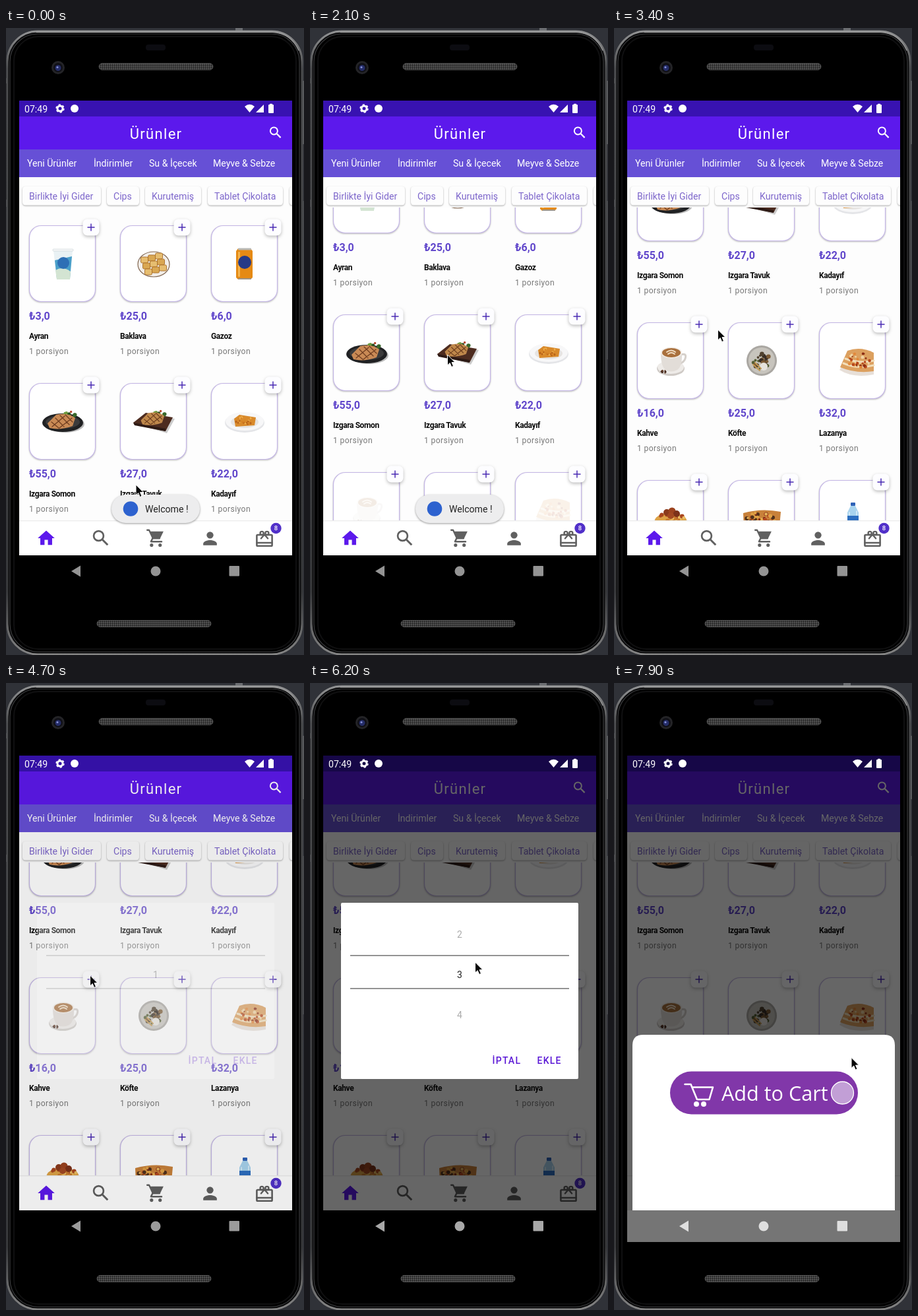
Write an HTML page that moves like this. It is 452x950 px and loops after 8 s.

```html
<!DOCTYPE html>
<html lang="tr">
<head>
<meta charset="utf-8">
<title>Ürünler</title>
<style>
  html, body { margin: 0; width: 100%; height: 100%; overflow: hidden; background: #303238; }
  svg { display: block; width: 452px; height: 950px; font-family: Roboto, sans-serif; }
  .card { fill: #fff; stroke: #c4b6e6; stroke-width: 1.2; filter: drop-shadow(0 1.5px 1.2px #0004); }
  .plus { fill: #fdfdff; filter: drop-shadow(0 2px 2.5px #0004); }
  .chip { fill: #fdfdfd; filter: drop-shadow(0 1px 1.3px #0005); }
  .price { font: 700 16px Roboto, sans-serif; fill: #6046cb; }
  .name { font: 700 12px Roboto, sans-serif; letter-spacing: -.4px; fill: #0c0c0c; }
  .portion { font-size: 12.1px; letter-spacing: .4px; fill: #777; }
  .button { font-weight: 500; font-size: 14px; letter-spacing: 1.25px; fill: #5a17d6; }
  .line { fill: none; stroke-linecap: round; stroke-linejoin: round; }
</style>
</head>
<body>
<svg id="stage" viewBox="0 0 452 950"></svg>
<script>
const LOOP = 8000, STEP = 100;
const COL = 138, ROW = 239, TOP = 299;

const rect = (x, y, w, h, fill, r = 0, extra = '') =>
  `<rect x="${x}" y="${y}" width="${w}" height="${h}" rx="${r}" fill="${fill}" ${extra}/>`;
const circle = (x, y, r, fill, extra = '') => `<circle cx="${x}" cy="${y}" r="${r}" fill="${fill}" ${extra}/>`;
const oval = (x, y, rx, ry, fill, extra = '') => `<ellipse cx="${x}" cy="${y}" rx="${rx}" ry="${ry}" fill="${fill}" ${extra}/>`;
const path = (d, fill, extra = '') => `<path d="${d}" fill="${fill}" ${extra}/>`;
const line = (d, color, w) => `<path class="line" d="${d}" stroke="${color}" stroke-width="${w}"/>`;
const text = (x, y, s, extra = '') => `<text x="${x}" y="${y}" ${extra}>${s}</text>`;
const at = (x, y, s, k = 1) => `<g transform="translate(${x} ${y}) scale(${k})">${s}</g>`;
const repeat = (n, f) => Array.from({ length: n }, (_, i) => f(i)).join('');

function scatter(n, seed, rx, ry, cy, colors, size) {
  let s = seed;
  const rnd = () => (s = (s * 16807) % 2147483647) / 2147483647;
  return repeat(n, i => {
    const a = rnd() * 6.283, d = Math.sqrt(rnd());
    return circle((Math.cos(a) * d * rx).toFixed(1), (cy + Math.sin(a) * d * ry).toFixed(1),
      (size * (.6 + rnd() * .6)).toFixed(1), colors[i % colors.length]);
  });
}

const herbs = (x, y) => at(x, y, scatter(12, 71, 10, 5, 0, ['#39692c', '#6d9a3f', '#284f21', '#b4442c'], 2.6));
const grilled = (color, dark) =>
  path('M-23 3L-10 -10Q8 -14 19 -5L15 7Q-4 14 -20 10Z', color) +
  line('M-17 1l11 9M-11 -5l13 13M-4 -9l14 14M4 -10l11 11M-16 8L3 -8M-5 10L14 -5', dark, 1.3);

// Each dish is drawn around the middle of its card.
const dishes = {
  ayran: path('M-14 -20H15L11 24H-9Z', '#e9f1f4') + path('M-12 -5L14 -11 11 22H-9Z', '#4a9fc9') +
    path('M-11 10Q0 3 12 12L11 24H-9Z', '#d3e4d2') + circle(1, -1, 9, '#2e6fb5') + rect(-15, -22, 31, 3, '#f7f8f8', 1, 'stroke="#ccd4d8" stroke-width=".7"'),
  baklava: oval(0, 1, 24, 19, '#f2eee9', 'stroke="#80654f" stroke-width="1.2"') +
    repeat(9, i => {
      const x = (i % 3 - 1) * 11 + (Math.floor(i / 3) - 1) * 3, y = (Math.floor(i / 3) - 1) * 9 - (i % 3 - 1) * 3;
      return rect(x - 5.5, y - 4, 11, 9, i % 2 ? '#d9a752' : '#e6bd70', 2, 'stroke="#a96d28" stroke-width=".9"');
    }),
  can: path('M-10 -23H9L12 -19V21L9 24H-10L-13 21V-19Z', '#e58a14') + rect(-10, -23.5, 20, 3, '#b9b9b5', 1) +
    rect(-10, 22, 20, 2, '#9e9384', 1) + rect(-10, -18, 3, 38, '#f4b44f', 1) + circle(0, -2, 10, '#263a86'),
  salmon: oval(4, 4, 29, 13, '#bbb') + oval(0, 2, 31, 14, '#202123') + oval(0, 1, 26, 10, '#3b3b3c') +
    herbs(12, -10) + grilled('#c98a55', '#6f3d20'),
  chicken: path('M-30 3L-12 -11 32 -4 20 18Z', '#ccc') + path('M-31 2L-12 -13 29 -6 18 15-29 5Z', '#4d2c20') +
    path('M-31 2L18 11V15L-29 6Z', '#2d1a15') + herbs(10, -11) + at(0, -4, grilled('#bf884b', '#6b3c1d'), .85),
  kadayif: oval(0, 2, 30, 15, '#e4e5e8') + oval(0, 0, 29, 14, '#f7f7f8') + oval(0, 1, 21, 9, '#e6e4e2') +
    path('M-16 -4L-8 -10 17 -6 15 6-14 8Z', '#d98a2b') + scatter(24, 9, 14, 6, -1, ['#eeb04d', '#b9641a', '#d88424'], 1.5),
  coffee: oval(0, 12, 21, 11, '#cfcac6') + oval(0, 10, 20, 10, '#eeebe8') +
    line('M15 -9Q25 -12 22 -3Q20 3 12 5', '#d5d0cb', 3) + path('M-15 -11H17Q18 8 10 14Q0 19 -8 14Q-15 8 -15 -11Z', '#e2ddd8') +
    oval(1, -12, 16, 8.5, '#f2ece5') + oval(1, -12, 14, 7, '#a9703d') + line('M-6 -13Q1 -18 7 -13M-4 -10Q1 -14 6 -10', '#f0ddc3', 2) +
    scatter(9, 33, 5, 3, 17, ['#3c241a', '#6b4430'], 1.5).replace(/cx="/g, 'transform="translate(-11 0)" cx="'),
  kofte: circle(0, 0, 23, '#aaa7a2') + circle(0, 0, 20, '#c7c4bd') + scatter(26, 17, 13, 12, 1, ['#50412f', '#7c5b36', '#555f35', '#382d25'], 3) +
    circle(3, 9, 6, '#e6e3dd') + line('M-13 6l10 9M-10 3l9 9', '#c39a55', 2),
  lasagne: path('M-20 14Q0 27 32 21V10H-17Z', '#e7dfd8') + path('M-19 10L-8 -15Q12 -22 32 -12V16Q5 20 -19 10Z', '#dca05f') +
    line('M-14 4Q8 13 32 7M-11 -3Q10 5 32 0', '#f2dfbb', 3) + scatter(34, 5, 18, 12, 0, ['#b8481d', '#f0d2a1', '#8d2e14', '#e2883a'], 2.2).replace(/cx="/g, 'transform="translate(11 0)" cx="'),
  pasta: oval(0, 8, 28, 12, '#e3dfdc') + oval(0, 3, 24, 11, '#dda246') + scatter(20, 41, 21, 8, 0, ['#e9bd62', '#c7782e', '#a9461f'], 3) +
    circle(-6, -9, 5, '#8a3a1c') + circle(2, -11, 5.5, '#9c431f') + circle(9, -7, 5, '#7c321a') + circle(0, -4, 5, '#a24822'),
  pizza: path('M-28 -8Q0 -16 29 -10L27 12-27 14Z', '#c8813a') + scatter(40, 23, 25, 9, 0, ['#7a2918', '#e9b85b', '#b64a22', '#4e301c', '#dfa045'], 2.6),
  water: rect(-3, -24, 7, 5, '#2e62b8', 1) + path('M-3 -19H4L9 -9V24H-8V-9Z', '#a8d3ee') + rect(-8, -4, 17, 12, '#2d6fc0') + line('M-5 -9V-5M6 -11V-5', '#e5f3fb', 1.4)
};

const products = [
  ['ayran', '3,0', 'Ayran'], ['baklava', '25,0', 'Baklava'], ['can', '6,0', 'Gazoz'],
  ['salmon', '55,0', 'Izgara Somon'], ['chicken', '27,0', 'Izgara Tavuk'], ['kadayif', '22,0', 'Kadayıf'],
  ['coffee', '16,0', 'Kahve'], ['kofte', '25,0', 'Köfte'], ['lasagne', '32,0', 'Lazanya'],
  ['pasta', '28,0', 'Makarna'], ['pizza', '30,0', 'Pizza'], ['water', '2,0', 'Su']
];

const productCard = ([dish, price, name], i) => {
  const row = Math.floor(i / 3);
  return at(i % 3 * COL, TOP + row * ROW,
    `<rect class="card" x="35.5" y=".5" width="100" height="115" rx="18"/>` +
    `<g class="row${row}">${at(86, 58, dishes[dish])}</g>` +
    `<rect class="plus" x="116.5" y="-9.5" width="25" height="25" rx="7"/>` +
    line('M124 3h10M129 -2v10', '#4a2bb4', 1.5) +
    text(35, 143, '₺' + price, 'class="price"') + text(35, 172, name, 'class="name"') +
    text(35, 194.5, '1 porsiyon', 'class="portion"'));
};

const searchIcon = (color, w) => circle(-2.6, -2.6, 5.5, 'none', `stroke="${color}" stroke-width="${w}"`) +
  `<path d="M1.5 1.5L7.6 7.6" stroke="${color}" stroke-width="${w + .2}"/>`;
const cartIcon = line('M-10 -9.5h2.3l4.6 9.8h7.6', '#606060', 1.8) + path('M-7 -8H9.2L5 .8H-3.4Z', '#606060') +
  line('M-3.5 0l-2 4H7', '#606060', 1.9) + circle(-4.8, 8.2, 2, '#606060') + circle(5.2, 8.2, 2, '#606060');
const giftIcon = rect(-9, -5, 18, 13, 'none', 1, 'stroke="#606060" stroke-width="2"') +
  line('M-9 4.2H9', '#606060', 2) + line('M-4 -.8L0 -5.5 4 -.8', '#606060', 1.8) +
  circle(-3, -7, 2, 'none', 'stroke="#606060" stroke-width="1.9"') + circle(3, -7, 2, 'none', 'stroke="#606060" stroke-width="1.9"');

const speaker = (x, y) => rect(x, y, 173, 10, '#343434', 5) + rect(x, y, 173, 10, 'url(#mesh)', 5, 'stroke="#555" stroke-width=".8"');

const phone = () => rect(0, 0, 452, 950, '#303238') +
  rect(0, 76, 6, 195, '#55575b') + rect(0, 84, 3, 176, '#202125') + rect(446, 80, 6, 96, '#5b5d60') +
  rect(446, 262, 6, 240, '#46484c') + rect(348, 0, 11, 6, '#6a6c70') +
  rect(2, 5, 447, 944, '#0a0a0b', 46, 'stroke="url(#rim)" stroke-width="3"') +
  rect(6, 9, 439, 936, '#000', 42, 'stroke="#3a3b3d" stroke-width="1.2"') +
  rect(12, 13, 428, 928, '#000', 37, 'stroke="#101011" stroke-width="2"') +
  line('M46 6.5H404Q432 8 444 34', '#a5a5a5', 1.1) +
  rect(212, 25, 30, 9, '#0c0c11', 4) + speaker(141, 53.5) + speaker(138, 897.5) +
  circle(79, 60, 10, '#242427') + circle(79, 60, 7, '#101016') + circle(79, 60.5, 4.5, '#252d68') + circle(78, 59.5, 1.5, '#8590d8');

const chips = [[25, 119, 'Birlikte İyi Gider'], [153, 49, 'Cips'], [211, 85, 'Kurutemiş'], [306, 114, 'Tablet Çikolata'], [430, 60, '']];
const tabs = [[32, 'Yeni Ürünler'], [133, 'İndirimler'], [217, 'Su &amp; İçecek'], [314, 'Meyve &amp; Sebze']];

const app = () => rect(20, 110, 414, 689, '#fdfdfd') +
  `<g clip-path="url(#listClip)"><g id="list">${products.map(productCard).join('')}</g></g>` +
  rect(20, 110, 414, 24, '#3812b1') + rect(20, 134, 414, 50, '#5c19ec') + rect(20, 184, 414, 42, '#6650d6') +
  text(227.6, 168, 'Ürünler', 'font-size="22" letter-spacing="1.3" fill="#fff" text-anchor="middle"') +
  at(409, 158.5, searchIcon('#fff', 2)) +
  tabs.map(([x, s]) => text(x, 210, s, 'font-size="14.1" fill="#fff"')).join('') +
  chips.map(([x, w, s]) => `<rect class="chip" x="${x}" y="240" width="${w}" height="28.5" rx="4.5"/>` +
    text(x + 10, 260, s, 'font-size="14.1" fill="#7d66cb"')).join('') +
  rect(20, 746, 414, 1.5, '#ececec') + rect(20, 747.5, 414, 51.5, '#fff') +
  at(61, 773, path('M-2 8v-6h4v6h5V0h3L0 -9-10 0h3v8z', '#5c19ec'), 1.28) +
  at(144, 773, searchIcon('#606060', 2), 1.35) + at(227, 773, cartIcon, 1.29) +
  at(309.5, 773.5, circle(0, -4, 4, '#606060') + path('M-8 8V6C-8 3.3-2.7 2 0 2S8 3.3 8 6V8Z', '#606060'), 1.29) +
  at(392, 774.5, giftIcon, 1.29) + circle(409.5, 758, 8.2, '#5130c9') +
  text(409.5, 761.4, '8', 'font-size="9.5" font-weight="500" fill="#fff" text-anchor="middle"');

const statusIcons = () => text(28, 127.7, '07:49', 'font-size="14.1" fill="#fff"') +
  circle(82, 122, 4, 'none', 'stroke="#fff" stroke-width="3"') +
  circle(82, 122, 5.7, 'none', 'stroke="#fff" stroke-width="2" stroke-dasharray="3 2.97"') +
  circle(104, 122, 6, '#fff') +
  path('M362 119Q369.5 112.5 377 119L369.5 128Z', '#fff') + path('M379 128L391 116V128Z', '#fff') +
  rect(398, 116, 8, 13, '#fff', 1) + rect(400, 114.8, 4, 2, '#fff');

const dialog = () => rect(47, 333, 360, 267, '#fff', 2) +
  rect(61, 412, 332, 1.8, '#888') + rect(61, 462, 332, 1.8, '#888') +
  `<g clip-path="url(#wheelClip)" font-size="14" text-anchor="middle">${repeat(6, i => text(227, 0, i + 1, 'class="digit"'))}</g>` +
  text(276.5, 577, 'İPTAL', 'class="button"') + text(344.5, 577, 'EKLE', 'class="button"');

const sheet = () => path('M28 900V549Q28 533 44 533H410Q426 533 426 549V900Z', '#fff') +
  `<g id="pill">${rect(-142.5, -32.5, 285, 65, '#8137a9', 32.5)}</g>` +
  line('M107.5 608h9l9.5 23h18.5l5.5 -18.500h-31', '#fff', 2.6) + circle(125, 638, 4, '#fff') + circle(136, 638, 4, '#fff') +
  text(163, 632.5, 'Add to Cart', 'font-size="30.6" fill="#fff" style="font-family:\'Open Sans\',\'Noto Sans\',sans-serif"') +
  `<path id="ring" d="M346.500 604a17 17 0 0 1 0 34a17 17 0 0 1 0 -34" pathLength="100" fill="#fff" stroke="#fff" stroke-width="1.3"/>`;

const toast = () => `<rect x="160" y="707" width="134" height="43" rx="21.5" fill="#ededee" style="filter:drop-shadow(0 1.5px 1.5px #0006)"/>` +
  circle(189, 728.5, 11.3, '#2d62cf') + text(211, 733.7, 'Welcome !', 'font-size="14.1" fill="#222"');

const clip = (id, x, y, w, h) => `<clipPath id="${id}">${rect(x, y, w, h, '#000')}</clipPath>`;
const stage = document.getElementById('stage');
stage.innerHTML = `<defs>
  ${clip('screenClip', 20, 110, 414, 737)}${clip('listClip', 20, 272, 414, 475)}${clip('wheelClip', 61, 345, 332, 195)}
  <pattern id="mesh" width="3" height="3" patternUnits="userSpaceOnUse">${circle(1, 1, .8, '#777')}${circle(2.5, 2.5, .6, '#161616')}</pattern>
  <linearGradient id="rim" x2="0" y2="1"><stop stop-color="#929394"/><stop offset=".06" stop-color="#4b4c4e"/><stop offset=".9" stop-color="#37383a"/><stop offset="1" stop-color="#858585"/></linearGradient>
</defs>${phone()}
<g clip-path="url(#screenClip)">${app()}
  ${rect(20, 110, 414, 689, '#000', 0, 'id="dim"')}
  <g id="toast">${toast()}</g><g id="dialog">${dialog()}</g><g id="sheet">${sheet()}</g>
  ${rect(20, 799, 414, 48, '#757575', 0, 'id="navBar"')}
  <g id="navIcons">${path('M99 823L113 814.5V831.500Z', '#fff')}${circle(227, 823, 7.5, '#fff')}${rect(338.5, 815, 15.5, 15.5, '#fff', 1)}</g>
  ${statusIcons()}
</g>
<g id="cursor">${path('M0 0V16L3.700 12.600 6.200 18.500 9 17.300 6.500 11.600H11.500Z', '#080808', 'stroke="#fff" stroke-width="1"')}</g>`;

const el = id => document.getElementById(id);
const digits = [...stage.querySelectorAll('.digit')];
const setOpacity = (node, v) => node.setAttribute('opacity', v);
const move = (node, x, y, k = 1) => node.setAttribute('transform', `translate(${x} ${y}) scale(${k})`);

// Linear interpolation through [time, value] pairs.
function key(t, ...points) {
  if (t <= points[0][0]) return points[0][1];
  for (let i = 1; i < points.length; i++) {
    const [t0, a] = points[i - 1], [t1, b] = points[i];
    if (t <= t1) return a + (b - a) * (t - t0) / (t1 - t0);
  }
  return points[points.length - 1][1];
}

function scrollAt(t) {
  if (t <= 2100) return key(t, [1900, 0], [2000, 46], [2100, 104]);
  const u = Math.min(1, (t - 2100) / 900);
  return 104 + 227 * (1 - (1 - u) ** 2);
}

function draw(t) {
  move(el('list'), 0, -scrollAt(t));
  stage.querySelectorAll('.row2').forEach(n => setOpacity(n, key(t, [2000, 0], [2100, .13], [2400, 1])));
  stage.querySelectorAll('.row3').forEach(n => setOpacity(n, key(t, [2500, 0], [2800, 1])));
  setOpacity(el('toast'), key(t, [2600, 1], [2900, 0]));

  setOpacity(el('dim'), key(t, [4600, 0], [4700, .07], [4800, .36], [4900, .6], [7300, .6], [7500, .43], [7700, .6]));
  setOpacity(el('dialog'), key(t, [4600, 0], [4700, .25], [4800, .8], [4900, 1], [7300, 1], [7400, .45], [7500, .04], [7600, 0]));
  const value = key(t, [5500, 1], [6000, 3]);
  digits.forEach((node, i) => {
    const d = i + 1 - value, shade = Math.round(34 + Math.min(1, Math.abs(d)) * 136);
    node.setAttribute('y', 447 + d * 60.6);
    node.setAttribute('fill', `rgb(${shade},${shade},${shade})`);
  });

  const rise = key(t, [7400, 0], [7500, .42], [7600, .85], [7700, 1]);
  setOpacity(el('sheet'), rise);
  move(el('sheet'), 0, (1 - rise) * 147);
  move(el('pill'), 227.5, 621, key(t, [7500, 1.112], [7900, 1]));
  const drawn = key(t, [7400, 0], [7500, 50], [7600, 100]);
  el('ring').setAttribute('stroke-dasharray', `${drawn} 200`);
  el('ring').setAttribute('fill-opacity', key(t, [7500, 0], [7800, .52]));
  setOpacity(el('navBar'), key(t, [7500, 0], [7700, 1]));
  setOpacity(el('navIcons'), key(t, [4600, .58], [4900, .66], [7300, .66], [7500, .77]));

  move(el('cursor'),
    key(t, [1000, 197], [1800, 202], [2100, 208.5], [2600, 200], [3400, 157.5], [4300, 127.5], [4800, 127.5], [5400, 248], [6000, 250.5], [6300, 250.5], [7000, 360]),
    key(t, [1000, 692], [1800, 607], [1900, 607], [2100, 495], [2300, 470], [3400, 457], [4300, 443], [4800, 443], [5400, 530], [6000, 423], [6300, 423], [7000, 567.5]));
}

function frame() {
  const t = performance.now() % LOOP;
  draw(Math.floor(t / STEP) * STEP);
  requestAnimationFrame(frame);
}
frame();
</script>
</body>
</html>
```
